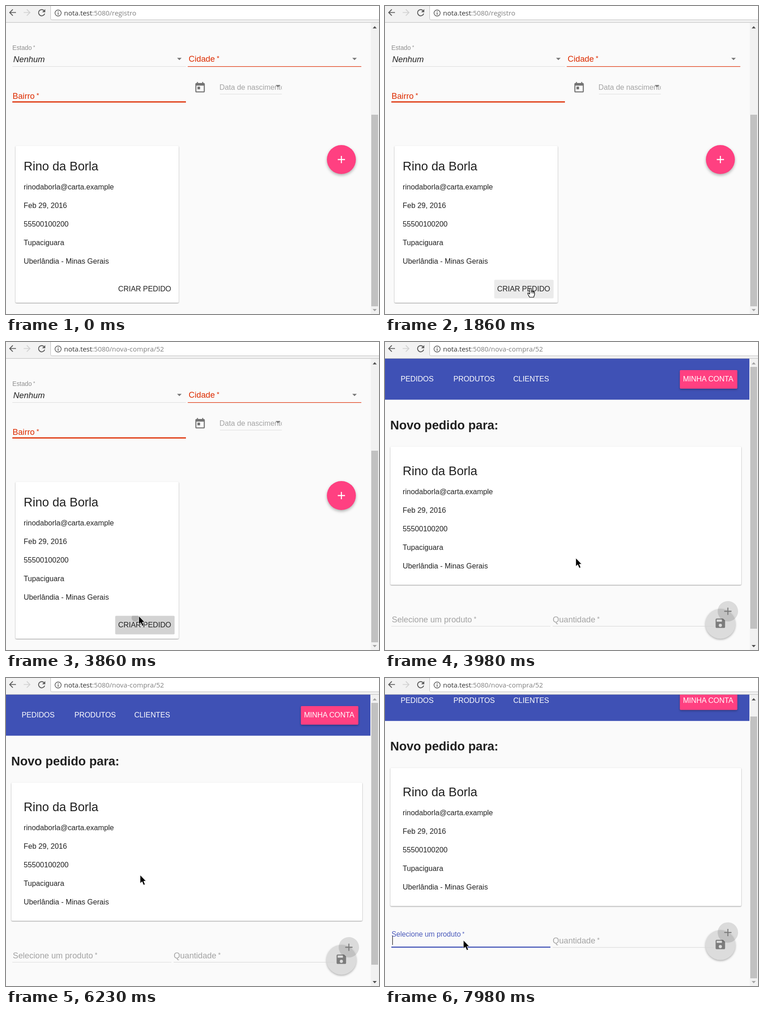
Recreate the animation shown at these times as an HTML page. Size 823 by 680 pixels, loop 8000 ms.

```html
<!DOCTYPE html>
<html lang="pt">
<head>
<meta charset="utf-8">
<title>Novo pedido</title>
<style>
  html, body { margin: 0; width: 100%; height: 100%; overflow: hidden; background: #fafafa; }
  svg { display: block; width: 823px; height: 680px; }
  text { font: 16.2px "Liberation Sans", Arial, sans-serif; fill: #212121; white-space: pre; }
  .title { font-size: 27.2px; }
  .bold { font-weight: bold; }
  .label { font-size: 18.2px; fill: #a3a3a3; }
  .small { font-size: 13.8px; fill: #8f8f8f; }
  .chosen { font-size: 18.4px; font-style: italic; }
  .error { font-size: 18.3px; fill: #dd2c00; }
  .star { font-size: 80%; }
  .hint { fill: #a3a3a3; }
  .white text { fill: #fff; }
  .active { font-size: 15.7px; fill: #4a5abb; }
  .url { font: 15px "Open Sans", "Noto Sans", sans-serif; fill: #333; }
  .url tspan { fill: #808080; }
  .line { fill: #dcdcdc; }
  .card { fill: #fff; filter: drop-shadow(0 1px 1px rgba(0,0,0,.42)); }
  .fab { filter: drop-shadow(0 3px 3px rgba(0,0,0,.3)); }
  .raised { filter: drop-shadow(0 2px 2px rgba(0,0,0,.3)); }
</style>
</head>
<body>
<svg viewBox="0 0 823 680">
  <defs>
    <g id="client">
      <text class="title" x="39" y="363">Rino da Borla</text>
      <text x="39" y="405">rinodaborla@carta.example</text>
      <text x="39" y="446">Feb 29, 2016</text>
      <text x="39" y="487">55500100200</text>
      <text x="39" y="528">Tupaciguara</text>
      <text x="39" y="569">Uberlândia - Minas Gerais</text>
    </g>
    <path id="drop" d="M-5-2.5H5L0 2.5Z" fill="#757575"/>
    <path id="plus" d="M-8 0H8M0-8V8" fill="none" stroke-width="2.3"/>
    <path id="back" d="M20 11H7.83l5.59-5.59L12 4l-8 8 8 8 1.41-1.41L7.83 13H20z"/>
    <clipPath id="dateClip"><path d="M472 160h136.5v40H472z"/></clipPath>
    <clipPath id="buttonClip"><path d="M241 604.5h131v41H241z"/></clipPath>
  </defs>
  <rect width="823" height="680" fill="#fafafa"/>

  <g id="clients">
    <text class="small" x="14" y="97">Estado<tspan class="star" dy="-2"> *</tspan></text>
    <text class="chosen" x="16" y="124">Nenhum</text>
    <use href="#drop" x="382.5" y="117"/>
    <rect class="line" x="14" y="133" width="383" height="1"/>
    <text class="error" x="403" y="122.5">Cidade<tspan class="star" dy="-3"> *</tspan></text>
    <use href="#drop" x="769" y="117"/>
    <rect x="401" y="133" width="383" height="1.2" fill="#dd2c00"/>
    <text class="error" x="14.5" y="204.5">Bairro<tspan class="star" dy="-3"> *</tspan></text>
    <rect x="14" y="210.5" width="383" height="2.6" fill="#dd2c00"/>
    <path transform="translate(414.3 166.5) scale(1.16)" fill="#737373" fill-rule="evenodd"
      d="M19 3h-1V1h-2v2H8V1H6v2H5c-1.1 0-2 .9-2 2v14c0 1.1.9 2 2 2h14c1.1 0 2-.9 2-2V5c0-1.1-.9-2-2-2zM19 19H5V8h14zM7 10h5v5H7z"/>
    <text class="hint" x="471" y="185" clip-path="url(#dateClip)">Data de nascimento</text>
    <use href="#drop" x="600" y="177"/>
    <rect class="line" x="472" y="194" width="136.5" height="1"/>
    <rect class="card" x="21" y="309" width="360" height="346" rx="2"/>
    <use href="#client"/>
    <rect id="button" x="241" y="604.5" width="131" height="41" rx="2"/>
    <circle id="ripple" cx="285" cy="609" fill="#b2b2b2" clip-path="url(#buttonClip)"/>
    <text x="247.5" y="630">CRIAR PEDIDO</text>
    <circle class="fab" cx="740" cy="339" r="32" fill="#ff4081"/>
    <use href="#plus" x="740" y="339" stroke="#fff"/>
  </g>

  <g id="order">
    <rect y="36" width="804" height="91.4" fill="#3f51b5"/>
    <rect class="raised" x="650.6" y="62" width="126.8" height="41" rx="2" fill="#ff4081"/>
    <g class="white">
      <text x="34.4" y="87.3">PEDIDOS</text>
      <text x="150.9" y="87.3">PRODUTOS</text>
      <text x="282.9" y="87.3">CLIENTES</text>
      <text x="657.4" y="87.3">MINHA CONTA</text>
    </g>
    <text class="title bold" x="11.5" y="193">Novo pedido para:</text>
    <rect class="card" x="12" y="231" width="774" height="305" rx="2"/>
    <use href="#client" y="-69"/>
    <g id="idle">
      <text class="label" x="15" y="619">Selecione um produto<tspan class="star" dy="-3"> *</tspan></text>
      <rect class="line" x="14" y="627" width="351" height="1"/>
    </g>
    <g id="focus">
      <text class="active" x="14.5" y="604">Selecione um produto<tspan class="star" dy="-2"> *</tspan></text>
      <rect x="14" y="625.6" width="351" height="2.4" fill="#3f51b5"/>
      <rect x="16" y="602" width="1.2" height="20" fill="#222"/>
    </g>
    <text class="label" x="370" y="619">Quantidade<tspan class="star" dy="-3"> *</tspan></text>
    <circle class="raised" cx="740" cy="622" r="33" fill="#dcdcdc"/>
    <rect x="370" y="627" width="355" height="1" fill="#d4d4d4"/>
    <path transform="translate(726 607) scale(1.16)" fill="#7c7c7c" fill-rule="evenodd"
      d="M17 3H5c-1.1 0-2 .9-2 2v14c0 1.1.9 2 2 2h14c1.1 0 2-.9 2-2V7zM12 19a3 3 0 1 1 0-6 3 3 0 0 1 0 6zM15 9H5V5h10z"/>
    <circle cx="756.5" cy="594.5" r="22.5" fill="#000" fill-opacity=".125"/>
    <use href="#plus" x="756.5" y="594.5" stroke="#7c7c7c"/>
  </g>

  <rect x="805" y="37" width="18" height="643" fill="#f1f1f1"/>
  <rect id="thumb" x="806" width="15" fill="#c1c1c1"/>
  <path id="up" d="M809 49.5h9l-4.5-5z"/>
  <path id="down" d="M809 669h9l-4.5 5z"/>

  <rect width="823" height="36" fill="#f2f2f2"/>
  <rect y="35.8" width="823" height="1" fill="#b8b8b8"/>
  <rect x="98.5" y="-6" width="740" height="36.5" rx="3" fill="#fff" stroke="#bcbcbc"/>
  <use href="#back" transform="translate(3 3) scale(.95)" fill="#5a5a5a"/>
  <use href="#back" transform="translate(58 3) scale(-.95 .95)" fill="#d2d2d2"/>
  <path transform="translate(67 3) scale(.98)" fill="#5a5a5a"
    d="M17.65 6.35A8 8 0 1 0 19.73 14h-2.08A6 6 0 1 1 16.22 7.78L13 11h7V4z"/>
  <circle cx="115" cy="15.5" r="6.8" fill="none" stroke="#5a5a5a" stroke-width="1.5"/>
  <path d="M115 11.5v2M115 14.7v4.8" stroke="#5a5a5a" stroke-width="1.7"/>
  <text class="url" x="128" y="21">nota.test<tspan id="path"></tspan></text>

  <g id="cursor" stroke-linejoin="round">
    <path id="arrow" transform="scale(1.08)" d="M0 0V17L4 13.5L7 20.5L10 19.2L7.2 12.5H12Z" fill="#000" stroke="#fff" stroke-width=".8"/>
    <path id="hand" fill="#fff" stroke="#000" stroke-width="1.2"
      d="M-1.8 1Q0-1 1.8 1V7Q3.4 5.7 4.6 7.5Q6 6.3 7 8.3Q9.3 7.7 9 10.5V14L7 20H-2L-5.5 13.5Q-7 10-4.5 10.5L-1.8 13Z"/>
    <path id="fingers" d="M1.8 7v4M4.6 7.5v4M7 8.3v3.5" stroke="#000"/>
  </g>
</svg>
<script>
const LOOP = 8000;
const $ = id => document.getElementById(id);
const set = (id, attrs) => { for (const k in attrs) $(id).setAttribute(k, attrs[k]); };
const show = (id, on) => { $(id).style.display = on ? '' : 'none'; };

// Pointer moves: start, end, steps, target x, target y
const moves = [
  [620, 1240, 6, 324, 624],
  [1860, 1860, 1, 321, 623],
  [1985, 2230, 3, 284, 434],
  [2860, 3110, 3, 284, 600],
  [3360, 3360, 1, 285, 609],
  [3860, 3860, 1, 293, 605],
  [3980, 3980, 1, 421, 477],
  [4860, 4980, 2, 416, 457],
  [5230, 5610, 4, 258, 495],
  [5860, 6230, 4, 296, 435],
  [7100, 7600, 5, 159, 602],
  [7850, 7980, 2, 173, 579]
];

function pointer(t) {
  let x = 576, y = 608;
  for (const [start, end, steps, tx, ty] of moves) {
    if (t < start) break;
    const step = t >= end ? steps : 1 + Math.floor((t - start) / (end - start) * (steps - 1));
    x += (tx - x) * step / steps;
    y += (ty - y) * step / steps;
  }
  return [x, y];
}

function draw(t) {
  const [x, y] = pointer(t);
  const ordering = t >= 3980, scrolled = t >= 6850, focused = t >= 7980;
  const opened = t >= 3860, pressed = t >= 3730;
  const over = t >= 620 && !ordering && x > 241 && x < 372 && y > 604 && y < 645;
  const hand = over && !opened;

  show('clients', !ordering);
  show('order', ordering);
  set('order', { transform: `translate(0 ${scrolled ? -32.6 : 0})` });
  show('idle', !focused);
  show('focus', focused);
  set('button', { fill: opened ? '#d3d3d3' : pressed ? '#dfdfdf' : over ? '#ebebeb' : 'none' });
  set('ripple', { r: opened ? 8 : pressed ? 4 : 0 });

  set('thumb', ordering ? { y: scrolled ? 85 : 55, height: 578 } : { y: 240, height: 423 });
  const atTop = ordering && !scrolled;
  set('up', { fill: atTop ? '#a3a3a3' : '#505050' });
  set('down', { fill: atTop ? '#505050' : '#a3a3a3' });
  $('path').textContent = opened ? ':5080/nova-compra/52' : ':5080/registro';

  show('cursor', t >= 620);
  set('cursor', { transform: `translate(${x} ${y})` });
  show('arrow', !hand);
  show('hand', hand);
  show('fingers', hand);
}

function tick() {
  draw(performance.now() % LOOP);
  requestAnimationFrame(tick);
}
tick();
</script>
</body>
</html>
```
